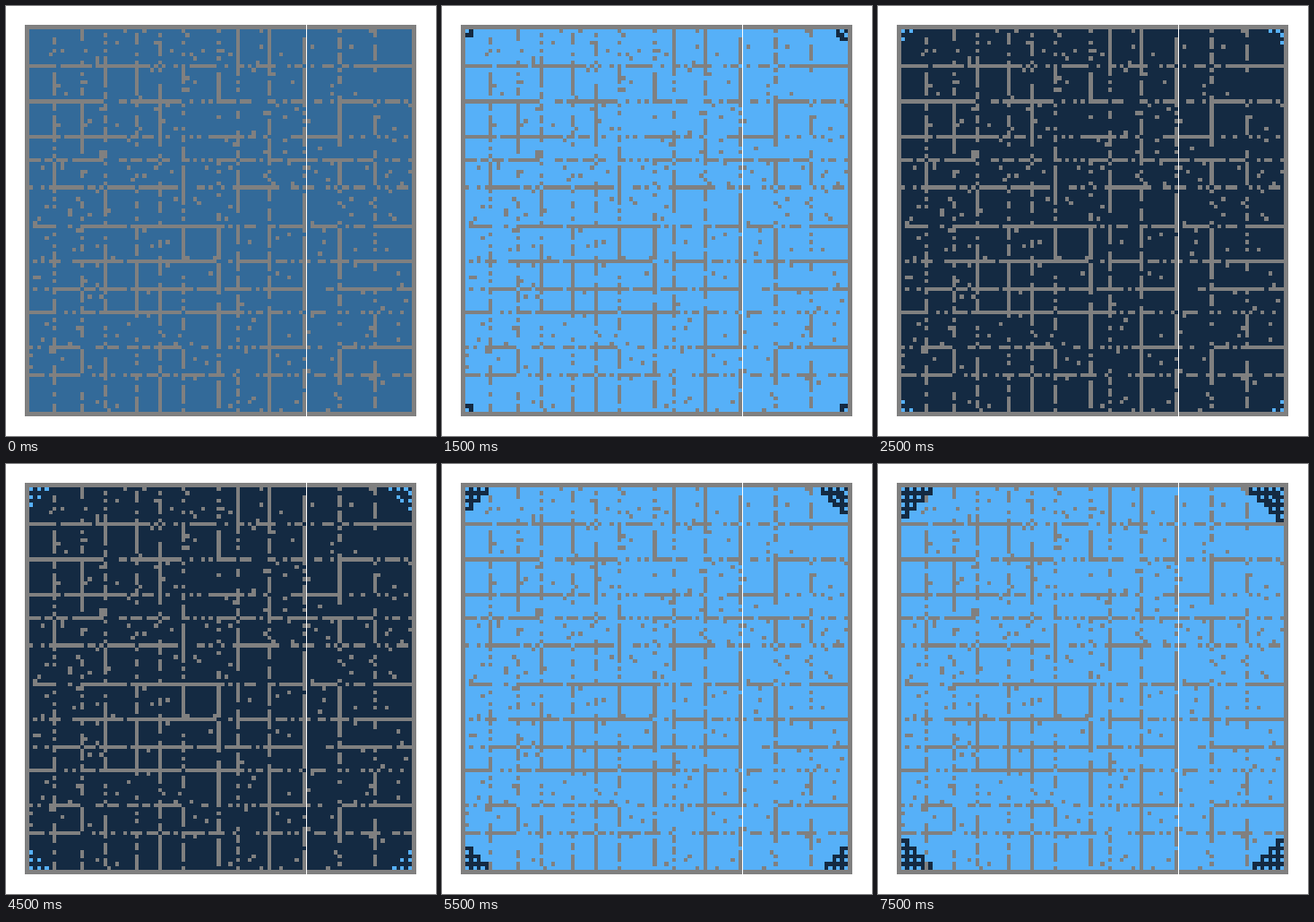
A matplotlib script for the animation above (8000 ms loop, 480x480 px).

```python
import numpy as np
import matplotlib.pyplot as plt
from matplotlib.animation import FuncAnimation

SIZE, N = 480, 100
START, CELL = 21.5, 4.36
WHITE, GRAY = (255, 255, 255), (128, 128, 128)
DARK, MID, LIGHT = (20, 42, 66), (51, 106, 153), (86, 176, 248)

# Cell positions of the broken wall lines
ROWS = [10, 19, 28, 34, 41, 51, 60, 67, 73, 82, 89]
COLS = [7, 14, 20, 28, 34, 40, 49, 54, 62, 71, 80, 89]


def broken_line(rng, crossings, solid_chance):
    """Between two crossings a wall is either nearly solid or dashed."""
    line = np.zeros(N, bool)
    stops = [0, *crossings, N]
    for first, last in zip(stops, stops[1:]):
        density = 0.93 if rng.random() < solid_chance else 0.5
        line[first:last] = rng.random(last - first) < density
    return line


def build_walls():
    rng = np.random.default_rng(12)
    edge = np.minimum(np.arange(N), N - 1 - np.arange(N))
    away_from_corners = edge[:, None] + edge[None, :] > 11
    walls = (rng.random((N, N)) < 0.027) & away_from_corners
    for c in COLS:
        walls[:, c] = broken_line(rng, ROWS, 0.3)
    for r in ROWS:
        walls[r] = broken_line(rng, COLS, 0.5)
    walls[edge == 0] = True
    walls[:, edge == 0] = True
    return walls


def corner_lattice(step):
    """Cells reached from the corners, and the lattice sites among them."""
    reached = np.zeros((N, N), bool)
    sites = np.zeros((N, N), bool)
    inner = np.arange(N) - 1
    for top in (True, False):
        for left in (True, False):
            i = (inner if top else inner[::-1])[:, None]
            j = (inner if left else inner[::-1])[None, :]
            # the top right lattice is one cell out of phase
            shift = int(top and not left)
            near = (i + j <= step + shift) & (i >= 0) & (j >= 0)
            even = np.minimum(i, j) % 2 == 0
            site = even & (np.maximum(i, j) % 2 == shift)
            reached |= near
            sites |= near & site
    return reached, sites


def grid_colors(step):
    grid = np.empty((N, N, 3), np.uint8)
    if step == 0:
        grid[:] = MID
    else:
        reached, sites = corner_lattice(step)
        grid[:] = DARK if step % 2 else LIGHT
        grid[reached] = DARK
        grid[sites] = LIGHT
    grid[WALLS] = GRAY
    return grid


def render(step):
    stage = np.full((SIZE, SIZE, 3), WHITE, np.uint8)
    px = np.arange(21, 458)
    idx = np.floor((px + 0.5 - START) / CELL).astype(int).clip(0, N - 1)
    stage[21:458, 21:458] = grid_colors(step)[idx[:, None], idx[None, :]]
    stage[21:458, 335] = WHITE  # thin seam
    return stage


WALLS = build_walls()

fig = plt.figure(figsize=(4.8, 4.8), dpi=100)
ax = fig.add_axes([0, 0, 1, 1])
ax.axis("off")
picture = ax.imshow(render(0), interpolation="nearest", aspect="auto")


def update(frame):
    picture.set_data(render((frame + 1) // 2))
    return [picture]


anim = FuncAnimation(fig, update, frames=16, interval=500,
                     repeat=True, repeat_delay=0)
plt.show()
```
